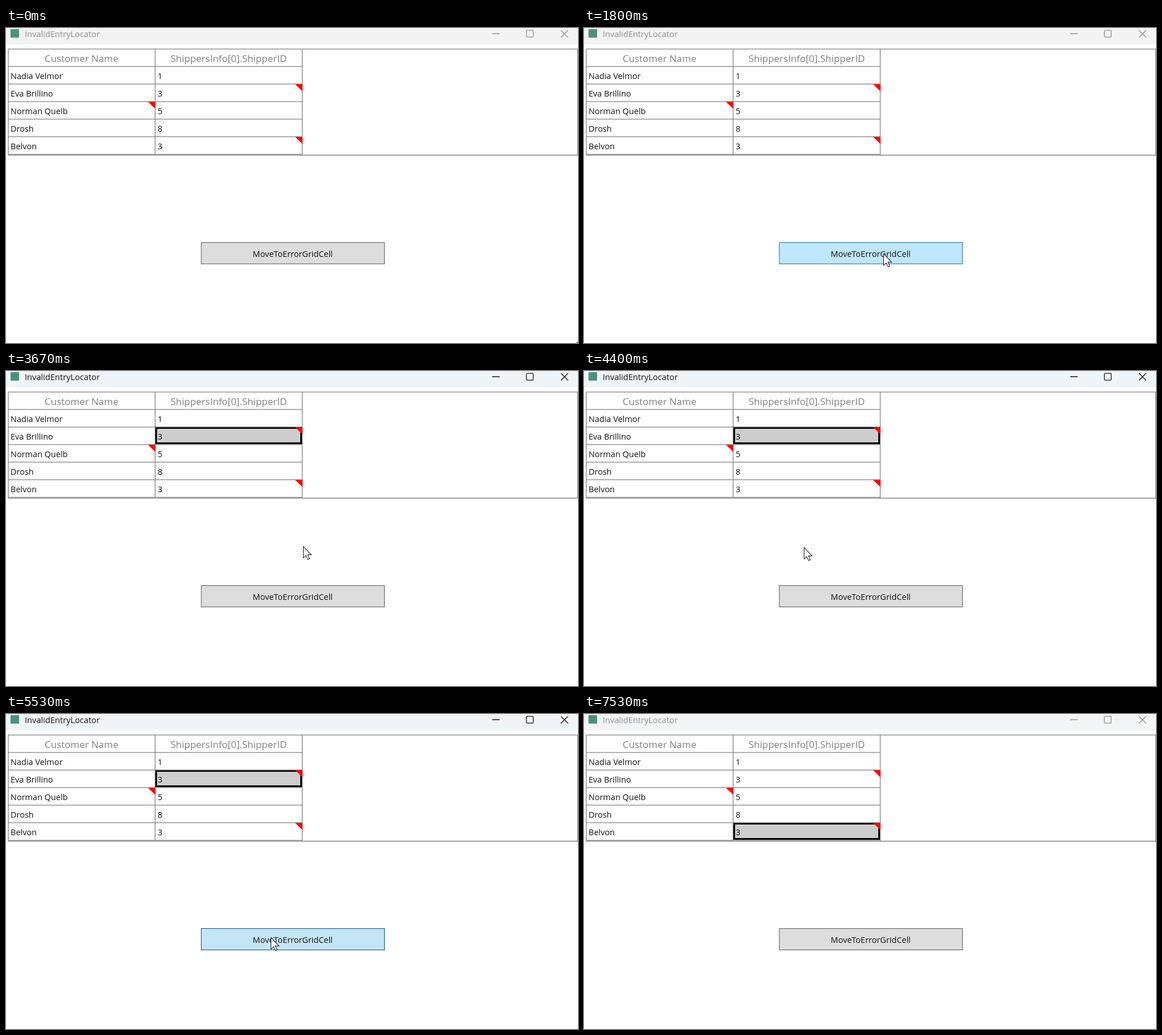
These frames come from a looping animation (1007x556 px, 7.87 s). An HTML page:

```html
<!DOCTYPE html>
<html lang="en">
<head>
<meta charset="utf-8">
<title>Grid error navigation</title>
<style>
  html, body { margin: 0; width: 100%; height: 100%; overflow: hidden; background: #fff; }
  svg { display: block; font: 14.5px "Open Sans", "Noto Sans", sans-serif; fill: #111; }
  .header { font-size: 17px; fill: #808080; text-anchor: middle; }
  .lines { fill: none; stroke: #808080; stroke-width: 1.3; }
  .flag { fill: #f00; }
  #caption { font-size: 14.65px; }
  #controls { fill: none; stroke-width: 1.3; }
  #selection { fill: #cdcdcd; stroke: #000; stroke-width: 3; }
  #button { stroke-width: 1.2; }
  #pointer { fill: #fff; stroke: #222; stroke-width: 1.1; }
  .idle { fill: #ddd; stroke: #707070; }
  .hover { fill: #bee6fd; stroke: #3c7fb1; }
  .pressed { fill: #c4e5f6; stroke: #2c628b; }
</style>
</head>
<body>
<svg width="1007" height="556" viewBox="0 0 1007 556">
  <rect width="1007" height="29" fill="#f3f3f3"/>
  <rect id="tint" width="1007" height="29" fill="#eff4f9"/>
  <rect x="8" y="2" width="15" height="15" fill="#4b917f"/>
  <text id="caption" x="33" y="15.5">InvalidEntryLocator</text>
  <g id="controls">
    <path d="M856 10H869M977 4L989.5 16.5M989.5 4L977 16.5"/>
    <rect x="916.2" y="4.2" width="12" height="12" rx="1.5"/>
  </g>
  <path class="lines" d="M4 37.2H1006.5V224.5H4ZM262.5 37.2V223M521.5 37.2V224"/>
  <path d="M4 223.6H521.5" stroke="#999" stroke-width="2.6"/>
  <text class="header" x="133" y="60">Customer Name</text>
  <text class="header" x="392" y="60">ShippersInfo[0].ShipperID</text>
  <g id="rows"></g>
  <rect id="button" x="343.8" y="378.6" width="322.6" height="37.8"/>
  <text x="504.7" y="404" text-anchor="middle">MoveToErrorGridCell</text>
  <path id="pointer" d="M.5 .7V20.8L5.2 16.6L8.3 23.6L11.3 22.3L8.2 15.4H14.6Z"/>
</svg>
<script>
const LOOP = 7870;
const TICK = 1000 / 15;

const rows = [
  { name: "Nadia Velmor", shipper: 1 },
  { name: "Eva Brillino", shipper: 3, flagX: 522 },
  { name: "Norman Quelb", shipper: 5, flagX: 263 },
  { name: "Drosh", shipper: 8 },
  { name: "Belvon", shipper: 3, flagX: 522 },
];

// Pointer strokes: ticks and quadratic curves; the pointer rests in between.
const strokes = [
  { start: 14, end: 18, from: [1005, 554], bend: [560, 410], to: [493, 412] },
  { start: 22, end: 27, from: [493, 412], bend: [510, 405], to: [527, 398] },
  { start: 55, end: 66, from: [523, 309], bend: [560, -92], to: [387, 311] },
  { start: 66, end: 78, from: [387, 311], bend: [360, 576], to: [466, 394] },
  { start: 97, end: 104, from: [334, 426], bend: [180, 490], to: [80, 575] },
];

const clicks = [
  { down: 32, up: 34, row: 1 },
  { down: 83, up: 86, row: 4 },
];
const focus = { gained: 32, lost: 111 };

const byId = id => document.getElementById(id);
const rowTop = i => 67.8 + 31 * i;
const ramp = (a, b, t) => Math.min(1, Math.max(0, (t - a) / (b - a)));

function paint(id, attributes) {
  for (const [name, value] of Object.entries(attributes)) byId(id).setAttribute(name, value);
}

function pointerAt(tick) {
  const { start, end, from, bend, to } = strokes.findLast(s => s.start <= tick) ?? strokes[0];
  const k = ramp(start, end, tick);
  return from.map((a, i) => Math.round((1 - k) ** 2 * a + 2 * k * (1 - k) * bend[i] + k * k * to[i]));
}

function rowMarkup({ name, shipper, flagX }, i) {
  const top = rowTop(i);
  const flag = flagX ? `<path class="flag" d="M${flagX - 13} ${top + .5}h13v12.5z"/>` : "";
  return `<path class="lines" d="M4 ${top}H521.5"/>
    <text x="8" y="${top + 21.9}">${name}</text>
    <text x="267" y="${top + 21.9}">${shipper}</text>${flag}`;
}

function render(time) {
  const tick = Math.floor((time % LOOP + 4) / TICK);
  const [x, y] = pointerAt(tick);
  const over = x >= 343 && x <= 667 && y >= 378 && y <= 417;
  const pressed = clicks.some(c => c.down <= tick && tick < c.up);
  const selected = clicks.findLast(c => c.up <= tick)?.row;
  const active = tick >= focus.gained && tick < focus.lost;
  const ink = active ? "#111" : "#8e8e8e";
  const tint = ramp(focus.gained - 2, focus.gained + 2, tick)
    - .65 * ramp(focus.lost - 2, focus.lost + 2, tick);

  paint("pointer", { transform: `translate(${x} ${y})` });
  paint("button", { class: pressed ? "pressed" : over ? "hover" : "idle" });
  paint("tint", { opacity: tint });
  paint("caption", { fill: ink });
  paint("controls", { stroke: ink });
  paint("selection", {
    y: rowTop(selected ?? 0) + 1.7,
    visibility: selected === undefined ? "hidden" : "visible",
  });
}

byId("rows").innerHTML =
  '<rect id="selection" x="264.5" width="255" height="27"/>' + rows.map(rowMarkup).join("");

const start = performance.now();
function loop() {
  render(performance.now() - start);
  requestAnimationFrame(loop);
}
loop();
</script>
</body>
</html>
```
